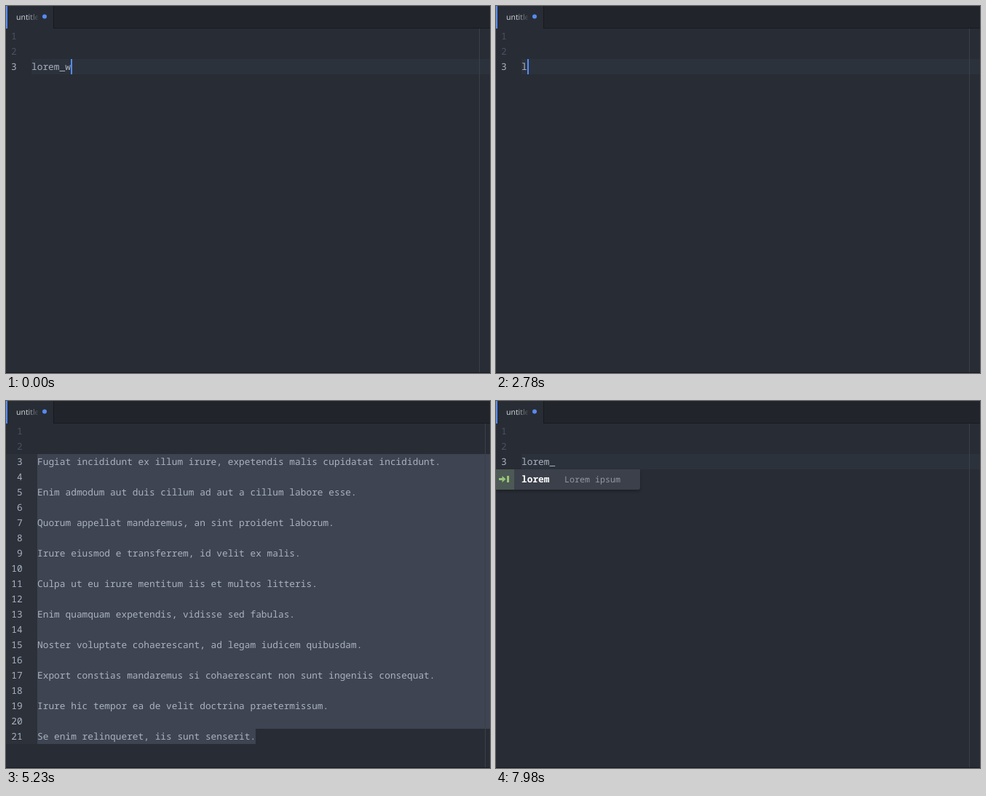
An HTML page that plays this animation: 665 by 505 pixels, repeating every 8 s.

```html
<!DOCTYPE html>
<html lang="en">
<head>
<meta charset="utf-8">
<title>Editor snippet demo</title>
<style>
  html, body { margin: 0; width: 100%; height: 100%; overflow: hidden; background: #282c34; }
  svg { display: block; width: 665px; height: 505px; }
  text { white-space: pre; text-rendering: geometricPrecision; }
  .mono { font-family: "Noto Sans Mono", "DejaVu Sans Mono", monospace; font-size: 12.83px; fill: #abb2bf; }
  .dim { fill: #495162; }
  .end { text-anchor: end; }
</style>
</head>
<body>
<svg viewBox="0 0 665 505" xmlns="http://www.w3.org/2000/svg">
  <defs>
    <linearGradient id="fade" gradientUnits="userSpaceOnUse" x1="14" y1="0" x2="44" y2="0">
      <stop offset=".5" stop-color="#d7dae0"/>
      <stop offset="1" stop-color="#d7dae0" stop-opacity=".1"/>
    </linearGradient>
    <filter id="shadow" x="-10%" y="-30%" width="120%" height="180%">
      <feDropShadow dx="0" dy="2" stdDeviation="2" flood-color="#000" flood-opacity=".3"/>
    </filter>
    <clipPath id="title"><rect x="14" y="0" width="30" height="30"/></clipPath>
  </defs>
  <rect width="665" height="505" fill="#282c34"/>

  <g id="page"></g>
  <rect id="guide" y="31" width="1" height="473" fill="#3b4049"/>
  <rect id="cursor" y="73" width="2" height="21" fill="#528bff"/>

  <g id="popup">
    <path d="M0 94H198V119a3 3 0 0 1-3 3H0Z" fill="#3a3f4b" filter="url(#shadow)"/>
    <rect y="94" width="25" height="28" fill="#4d5954"/>
    <path d="M4 106H8.500V103L13.500 107.500L8.500 112V109H4ZM15 103H18V112H15Z" fill="#98c379"/>
    <text class="mono" x="35" y="112" style="font-weight:700;fill:#fff">lorem</text>
    <text class="mono" x="94" y="112" style="font-size:11.670px;fill:#9398a2">Lorem ipsum</text>
  </g>

  <rect width="665" height="31" fill="#21252b"/>
  <rect y="30" width="665" height="1" fill="#181a1f"/>
  <rect width="65" height="31" fill="#282c34"/>
  <rect x="65" width="1" height="31" fill="#181a1f"/>
  <rect width="2" height="31" fill="#568af2"/>
  <text x="14" y="19" clip-path="url(#title)" fill="url(#fade)" font-size="10.5" font-family="'Open Sans', 'Noto Sans', sans-serif">untitled</text>
  <circle cx="53" cy="14.500" r="3" fill="#568af2"/>
  <rect y="504" width="665" height="1" fill="#181a1f"/>
</svg>
<script>
const LOOP = 8000, CHAR = 7.698, ROW = 21, TOP = 31;
const el = id => document.getElementById(id);

const words = [
  'duis fore dolore quorum eram fore aute amet legam quid quae culpa fugiat noster',
  'duis esse export constias velit quis culpa'
];
const sentences = [
  'Fugiat incididunt ex illum irure, expetendis malis cupidatat incididunt.',
  'Enim admodum aut duis cillum ad aut a cillum labore esse.',
  'Quorum appellat mandaremus, an sint proident laborum.',
  'Irure eiusmod e transferrem, id velit ex malis.',
  'Culpa ut eu irure mentitum iis et multos litteris.',
  'Enim quamquam expetendis, vidisse sed fabulas.',
  'Noster voluptate cohaerescant, ad legam iudicem quibusdam.',
  'Export constias mandaremus si cohaerescant non sunt ingeniis consequat.',
  'Irure hic tempor ea de velit doctrina praetermissum.',
  'Se enim relinqueret, iis sunt senserit.'
].join('\n\n').split('\n');

// Words the spell checker accepts
const known = new Set(('fore quorum quid quae culpa export ex ad a an id e et sed non hic de se').split(' '));

const typed = (at, text, opts = {}) => ({ at, lines: [text], cursor: true, ...opts });
const block = (at, lines, spell) => ({ at, lines, spell, selected: true });
const pop = { popup: true };

const states = [
  typed(0, 'lorem_w'),
  typed(390, 'lorem_w2'),
  typed(510, 'lorem_w20'),
  block(1040, words, false),
  block(1470, words, true),
  typed(2780, 'l'),
  typed(2900, 'lo', pop),
  typed(3020, 'lor', pop),
  typed(3140, 'lore', pop),
  typed(3290, 'lorem', pop),
  typed(3700, 'lorem_', pop),
  typed(3850, 'lorem_s', pop),
  typed(4290, 'lorem_s', { cursor: false }),
  typed(4560, 'lorem_s', { cursor: false, spell: true }),
  typed(4710, 'lorem_s1'),
  typed(4830, 'lorem_s10'),
  block(5230, sentences, false),
  block(5670, sentences, true),
  typed(6720, 'l'),
  typed(6840, 'lo', pop),
  typed(7000, 'lore', pop),
  typed(7140, 'lorem', pop),
  typed(7550, 'lorem_', pop),
  typed(7980, 'lorem_', { popup: true, cursor: false })
];

const rect = (x, y, w, h, fill) =>
  `<rect x="${x}" y="${y}" width="${w}" height="${h}" fill="${fill}"/>`;
const label = (x, y, text, cls) => `<text class="mono ${cls}" x="${x}" y="${y}">${text}</text>`;

function underline(line, left, top) {
  let out = '';
  for (const m of line.matchAll(/\w+/g)) {
    if (known.has(m[0].toLowerCase())) continue;
    const x = Math.round(left + m.index * CHAR);
    const len = Math.round(m[0].length * CHAR);
    const gap = (len - 2) / Math.round((len - 2) / 4) - 2;
    out += `<path d="M${x} ${top + 20}h${len}" stroke="#c73c3f" stroke-width="2" stroke-dasharray="2 ${gap}"/>`;
  }
  return out;
}

function draw(s) {
  const count = s.lines.length + 2;
  const shift = count > 9 ? 8 : 0;
  const left = 35 + shift;
  let back = '', front = '';
  for (let n = 1; n <= count; n++) {
    const top = TOP + (n - 1) * ROW;
    const line = n > 2 ? s.lines[n - 3] : '';
    if (n > 2) {
      if (s.selected) {
        const right = n === count ? Math.round(left + line.length * CHAR) : 665;
        back += rect(0, top, left, ROW, '#2c313a') + rect(left, top, right - left, ROW, '#3e4451');
      } else {
        back += rect(left, top, 665 - left, ROW, '#2c323c');
      }
    }
    front += label(14.7 + shift, top + 15, n, n > 2 ? 'end' : 'end dim');
    if (line) front += label(left, top + 15, line, '');
    if (s.spell) front += underline(line, left, top);
  }
  el('page').innerHTML = back + front;
  el('guide').setAttribute('x', 650 + shift);
  el('cursor').setAttribute('x', Math.round(35 + s.lines[0].length * CHAR - 0.02));
  el('cursor').style.display = s.cursor ? '' : 'none';
  el('popup').style.display = s.popup ? '' : 'none';
}

let shown = null;
const start = performance.now();
function tick() {
  const t = (performance.now() - start) % LOOP;
  const s = states.findLast(state => state.at <= t);
  if (s !== shown) draw(shown = s);
  requestAnimationFrame(tick);
}
tick();
</script>
</body>
</html>
```
